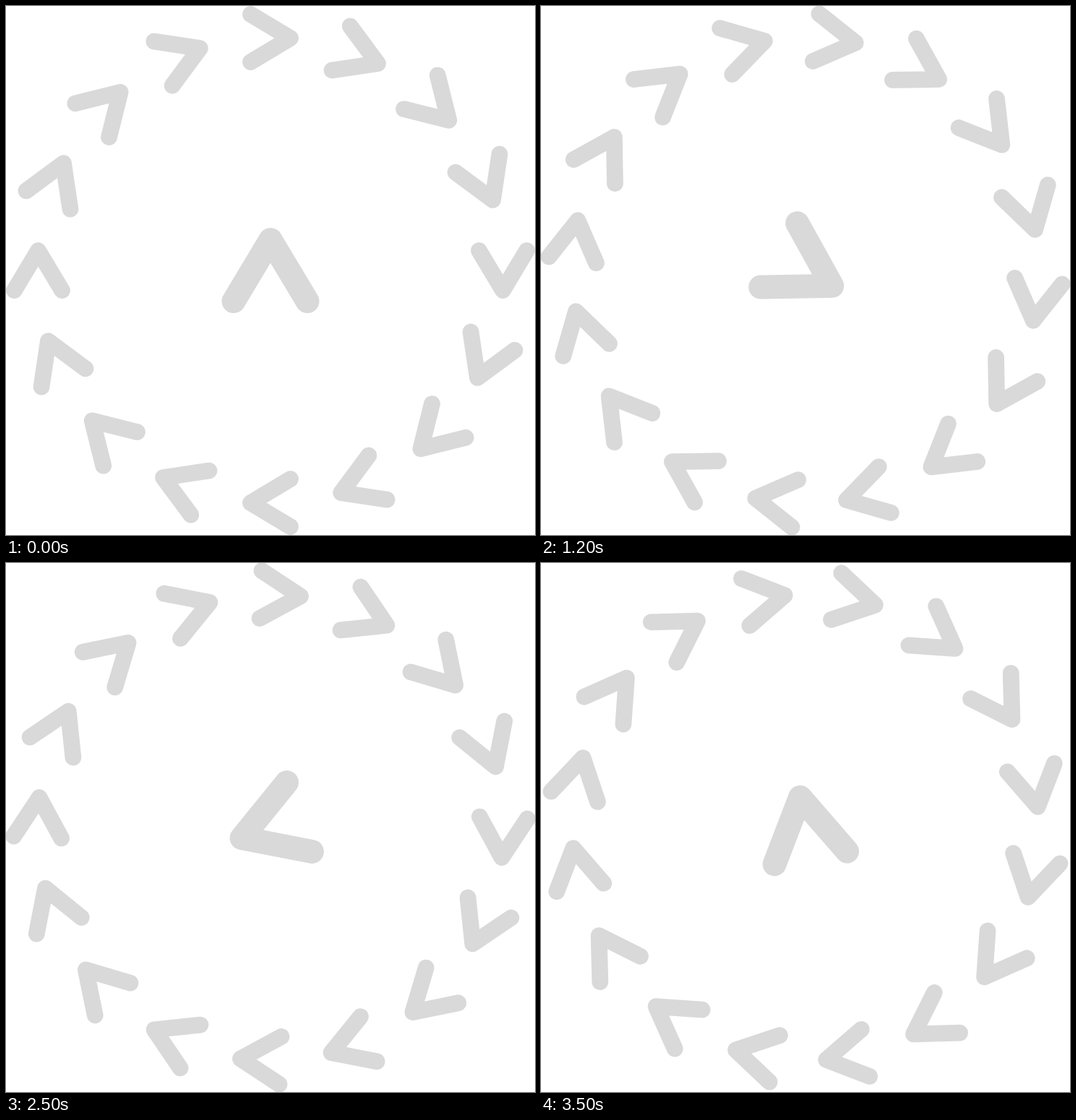
Recreate the animation shown at these times as an HTML page. Size 732 px wide and 732 px high, loop 3.6 s.

```html
<!DOCTYPE html>
<html lang="en">
<head>
<meta charset="utf-8">
<title>Rotating chevrons</title>
<style>
  html, body { margin: 0; width: 100%; height: 100%; overflow: hidden; background: #fff; }
  svg { display: block; width: 100vw; height: 100vh; }
</style>
</head>
<body>
<svg viewBox="-366 -366 732 732">
  <g id="wheel" fill="none" stroke="#d9d9d9" stroke-linecap="round" stroke-linejoin="round">
    <path d="M-51 42.5L0 -42.5L51 42.5" stroke-width="33"/>
    <g id="ring" stroke-width="22.8"></g>
  </g>
</svg>
<script>
  const COUNT = 16, STEP_MS = 100, STEPS = 36;
  const wheel = document.getElementById('wheel');

  document.getElementById('ring').innerHTML = Array.from({ length: COUNT }, (_, i) =>
    `<path d="M-354.5 27.5L-321.5 -27.5L-288.5 27.5" transform="rotate(${i * 360 / COUNT})"/>`
  ).join('');

  const start = performance.now();

  function draw(now) {
    const step = Math.floor(Math.max(0, now - start) / STEP_MS) % STEPS;
    wheel.setAttribute('transform', `rotate(${step * 360 / STEPS})`);
    requestAnimationFrame(draw);
  }
  draw(start);
</script>
</body>
</html>
```
